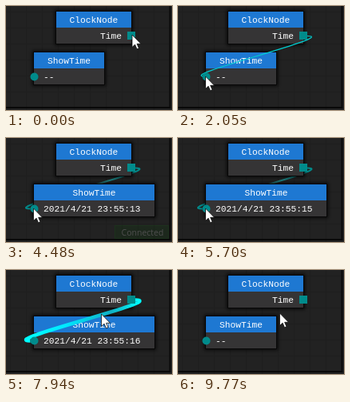
Recreate the animation shown at these times as an HTML page. Size 208 by 130 pixels, loop 9.97 s.

```html
<!DOCTYPE html>
<html lang="en">
<head>
<meta charset="utf-8">
<title>Node link</title>
<style>
  html, body { margin: 0; width: 100%; height: 100%; overflow: hidden; background: #222; }
  svg { display: block; width: 208px; height: 130px; }
  text { fill: #fff; font: 11.25px "Liberation Mono", monospace; }
  .mid { text-anchor: middle; }
  .head { fill: #1e78d2; }
  .body { fill: #353435; }
  .edge { fill: none; stroke: #080808; }
  .shade { fill: #000; filter: url(#blur); opacity: .85; }
  .hover .shade { fill: #8c8c8c; }
  .hover .edge { stroke: #747474; }
  .port { fill: #008b8b; }
  .link { fill: none; }
  #toast rect { fill: #0c400c; stroke: #087008; }
  #toast text { font: 10.5px "Open Sans", sans-serif; }
</style>
</head>
<body>
<svg viewBox="0 0 208 130">
  <defs>
    <filter id="blur" x="-20%" y="-30%" width="140%" height="160%">
      <feGaussianBlur stdDeviation="2"/>
    </filter>
    <pattern id="grid" x="5" y="7" width="20" height="20" patternUnits="userSpaceOnUse">
      <path d="M.5 0V20M0 .5H20" stroke="#1e1e1e"/>
    </pattern>
    <linearGradient id="idle" gradientUnits="userSpaceOnUse" x1="24" y1="0" x2="168" y2="0">
      <stop offset="0" stop-color="#008b8b"/>
      <stop offset=".6" stop-color="#2f7676"/>
      <stop offset="1" stop-color="#008b8b"/>
    </linearGradient>
    <linearGradient id="glow" gradientUnits="userSpaceOnUse" x1="24" y1="0" x2="168" y2="0">
      <stop offset="0" stop-color="#00ffff"/>
      <stop offset=".35" stop-color="#00e8ff"/>
      <stop offset=".75" stop-color="#10b0c4"/>
      <stop offset="1" stop-color="#00ffff"/>
    </linearGradient>
  </defs>
  <rect width="208" height="130" fill="#222"/>
  <rect width="208" height="130" fill="url(#grid)"/>
  <path d="M0 127H205.5V0" fill="none" stroke="#090909" stroke-width="2"/>

  <path id="back" class="link"/>

  <g id="clock">
    <rect class="shade" x="61" y="5" width="98" height="44"/>
    <rect class="body" x="63" y="7" width="94" height="40"/>
    <rect class="head" x="63" y="7" width="94" height="20"/>
    <rect class="edge" x="62.5" y="6.5" width="95" height="41"/>
    <text class="mid" x="110" y="21">ClockNode</text>
    <text x="118" y="41">Time</text>
  </g>

  <g id="show">
    <rect class="shade" x="33" y="56" height="44"/>
    <rect class="body" x="35" y="58" height="40"/>
    <rect class="head" x="35" y="58" height="20"/>
    <rect class="edge" x="34.5" y="57.5" height="41"/>
    <text id="title" class="mid" y="72">ShowTime</text>
    <text id="value" x="47" y="91.5"></text>
  </g>

  <path id="front" class="link"/>
  <rect class="port" x="152" y="32" width="10" height="10"/>
  <circle class="port" cx="35.5" cy="88.5" r="5"/>

  <g id="toast">
    <rect x="136.5" y="109.5" width="67" height="16"/>
    <text class="mid" x="171" y="121.5">Connected</text>
  </g>

  <path id="cursor" d="M0 0V15.5L3.6 12.2L6 17.8L8.5 16.8L6.1 11.3H11Z"
        fill="#fff" stroke="#111" stroke-width=".8"/>
</svg>
<script>
const LOOP = 9970;
const OUT = [162, 37.5], IN = [30.5, 88.5];
const JOIN = 2810, CUT = 9650;
const CURVATURE = .3;

// Each track lists [start time, value...]; values hold until the next entry.
const pointer = [
  [0, 158, 36], [100, 163, 54], [900, 150, 48], [1000, 112, 54],
  [1230, 58, 71], [1440, 56, 85], [1650, 42, 90], [1850, 40, 91],
  [2050, 34.5, 88], [6720, 63.5, 72], [7940, 119.5, 55],
  [8140, 124, 55], [8340, 127.5, 54]
];
const seconds = [
  [JOIN, 11], [3680, 12], [4480, 13], [4880, 14], [5700, 15], [6720, 16], [8750, 17]
];
const toastAlpha = [
  [0, 0], [JOIN, .5], [2860, 1], [3880, .8], [4080, .6], [4280, .4], [4480, .2], [4680, 0]
];

const el = id => document.getElementById(id);
const at = (track, t) => track.findLast(step => step[0] <= t).slice(1);

function curve([x1, y1], [x2, y2]) {
  const d = Math.hypot(x2 - x1, y2 - y1) * CURVATURE;
  return `M${x1} ${y1}C${x1 + d} ${y1} ${x2 - d} ${y2} ${x2} ${y2}`;
}

function setLink(id, end, stroke, width) {
  const path = el(id);
  path.setAttribute("d", end ? curve(OUT, end) : "");
  path.setAttribute("stroke", stroke);
  path.setAttribute("stroke-width", width);
}

function setWidth(w) {
  const pads = [4, 0, 0, 1];
  el("show").querySelectorAll("rect").forEach((r, i) => r.setAttribute("width", w + pads[i]));
  el("title").setAttribute("x", 35 + w / 2);
}

function draw(t) {
  const [x, y] = at(pointer, t);
  const joined = t >= JOIN && t < CUT;
  const lit = t >= 7940 && joined;
  const dragging = t >= 100 && t < JOIN;

  el("cursor").setAttribute("transform", `translate(${x} ${y})`);
  setWidth(joined ? 151 : 88);
  el("value").textContent = joined ? "2021/4/21 23:55:" + at(seconds, t)[0] : "--";
  el("show").classList.toggle("hover", t >= 6720 && t < 7940);
  el("toast").style.opacity = at(toastAlpha, t)[0];

  setLink("back", joined && !lit && IN, "url(#idle)", 2);
  if (lit) setLink("front", IN, "url(#glow)", 4.5);
  else setLink("front", dragging && [x, y], "#00cdd0", 1.2);
}

const start = performance.now();
function tick(now) {
  draw(Math.max(0, now - start) % LOOP);
  requestAnimationFrame(tick);
}
draw(0);
requestAnimationFrame(tick);
</script>
</body>
</html>
```
